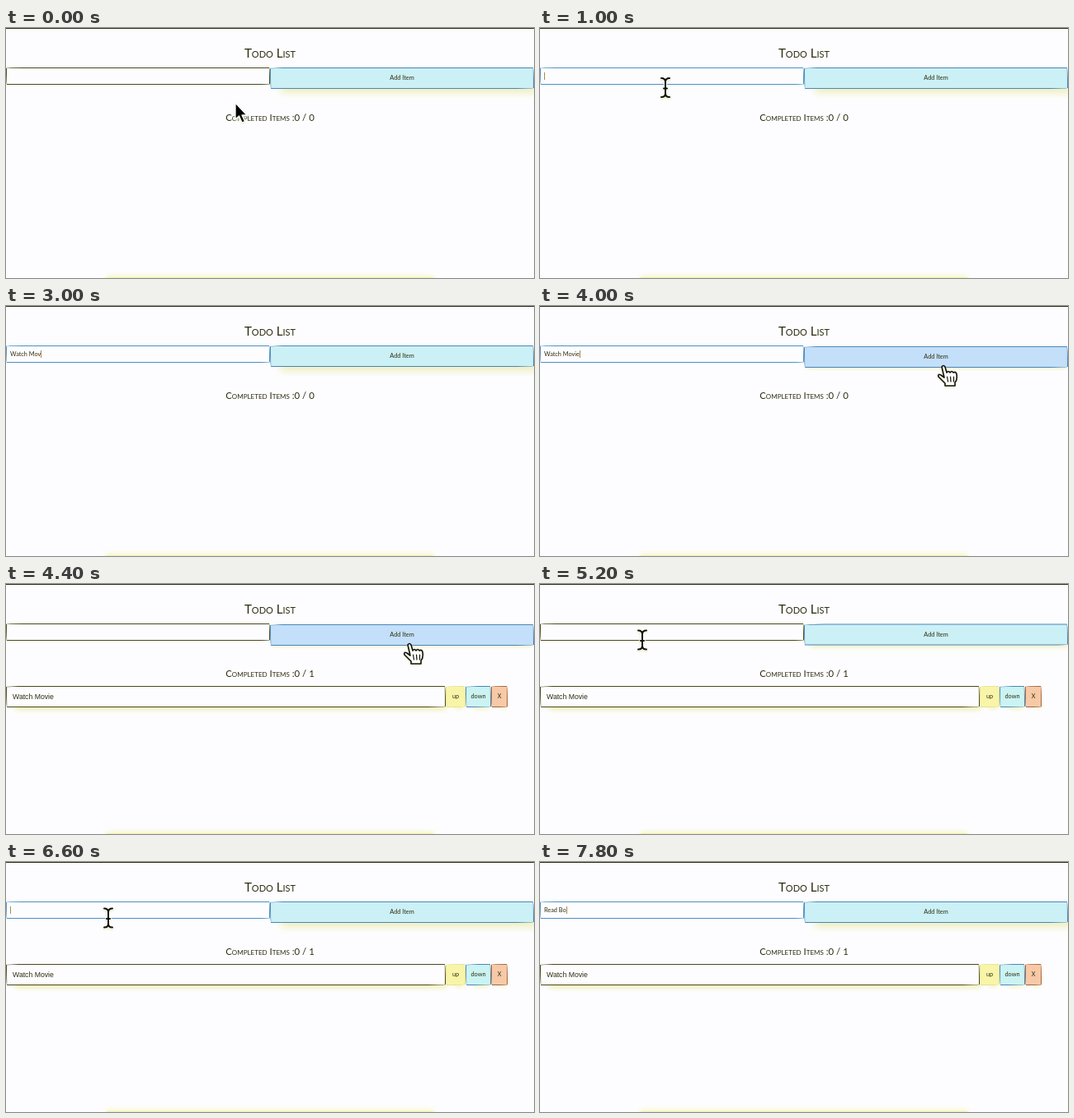
Write an HTML page that moves like this. It is 640 by 304 pixels and loops after 8 s.

```html
<!DOCTYPE html>
<html lang="en">
<head>
<meta charset="utf-8">
<title>Todo List</title>
<style>
  html, body { margin: 0; width: 100%; height: 100%; overflow: hidden; background: #fdfdff; }
  #stage {
    position: relative; width: 640px; height: 304px; overflow: hidden;
    background: #fdfdff; color: #2e2d10; font: 7.3px Lato, sans-serif;
  }
  #stage > *, #row > * { position: absolute; box-sizing: border-box; white-space: pre; }
  #topline { left: 0; top: 0; width: 640px; height: 1px; background: #2c2c14; }
  .heading { left: 0; width: 640px; text-align: center; font-variant: small-caps; }
  #title { top: 19.5px; font-size: 15.2px; line-height: 21px; }
  #count { top: 100px; font-size: 11.4px; line-height: 17px; }
  .box {
    border: 1px solid #4a4917; background: #fdfdff;
    border-radius: 127px 7px 112px 7px / 7px 112px 7px 127px;
  }
  #field { left: 0; top: 48px; width: 320px; height: 21px; padding-left: 4px; line-height: 20px; }
  #field.focus { border-color: #4c8fc4; }
  #caret { display: inline-block; width: .8px; height: 9px; background: #a88c48; vertical-align: -1.5px; }
  .button { text-align: center; }
  #add { left: 320px; top: 48px; width: 320px; height: 26px; line-height: 23px; border-color: #4b86b5; }
  #row > * { top: 124px; height: 26px; line-height: 23px; }
  #item {
    left: 0; width: 533px; padding-left: 7px; line-height: 25px !important;
    font: 8.7px "Liberation Sans", Arial, sans-serif; box-shadow: 6px 8px 6px -5px #f0f0b4;
  }
  #row .button { box-shadow: 4px 8px 6px -7px #eeeeaa; }
  #up { left: 533px; width: 24px; background: #f8f5a9; border-color: #e9e18c; }
  #down { left: 557px; width: 31px; background: #cbf3f3; border-color: #4b86b5; }
  #remove { left: 588px; width: 20px; background: #f7c9a6; border-color: #a0663c; }
  #footer { left: 122px; top: 303px; width: 396px; height: 12px; background: #f2f2b0; box-shadow: 0 0 8px #f2f2b0; }
  #pointer { left: 0; top: 0; overflow: visible; filter: drop-shadow(.5px 1px 1px #e8e8c0); }
</style>
</head>
<body>
<div id="stage">
  <div id="topline"></div>
  <div id="title" class="heading">Todo List</div>
  <div id="field" class="box"><span id="typed"></span><i id="caret"></i></div>
  <div id="add" class="box button">Add Item</div>
  <div id="count" class="heading"></div>
  <div id="row">
    <div id="item" class="box">Watch Movie</div>
    <div id="up" class="box button">up</div>
    <div id="down" class="box button">down</div>
    <div id="remove" class="box button">X</div>
  </div>
  <div id="footer"></div>
  <svg id="pointer" width="1" height="1" stroke-linejoin="round" stroke-linecap="round">
    <path id="arrow" d="M0 0V20L4.5 16L8 24L11.5 22.5L8 15H14Z" fill="#000" stroke="#fff" stroke-width="1.3"/>
    <g id="beam" fill="none">
      <path d="M-5-11.5Q0-11.5 0-7Q0-11.5 5-11.5M0-7V7M-5 11.5Q0 11.5 0 7Q0 11.5 5 11.5M-2 1H2" stroke="#fff" stroke-width="3.4"/>
      <path d="M-5-11.5Q0-11.5 0-7Q0-11.5 5-11.5M0-7V7M-5 11.5Q0 11.5 0 7Q0 11.5 5 11.5M-2 1H2" stroke="#111106" stroke-width="2"/>
    </g>
    <g id="hand" stroke="#111106" stroke-width="1.6" fill="#fff">
      <path d="M-2 1Q0-2 2 1L4 8Q6 5 8 8Q10 5 12 8Q15 6 16 10Q17 17 14 20V24H2V21L-6 13Q-7 9-3 11L1 14Z"/>
      <path d="M4.5 13L5.5 19M8.5 13L9 19M12.5 13V19" fill="none" stroke-width="1.2"/>
    </g>
  </svg>
</div>
<script>
const LOOP = 8000, STEP = 200, KEY_DELAY = 150;
const ADDED = 4200;
const typing = [
  { text: "Watch Movie", focus: 1000, start: 1700, end: ADDED },
  { text: "Read Book", focus: 5600, start: 6800, end: LOOP }
];
// time, x, y of the pointer's hot spot
const path = [
  [0, 278, 91], [800, 152, 72.5], [3400, 152, 72.5],
  [4000, 489, 73], [4600, 489, 73], [5200, 124, 68], [LOOP, 124, 68]
];
const $ = id => document.getElementById(id);
const show = (id, on) => { $(id).style.visibility = on ? "visible" : "hidden"; };
const ramp = (t, from, to) => {
  const p = Math.min(1, Math.max(0, (t - from) / (to - from)));
  return p * p * (3 - 2 * p);
};

function pointerAt(t) {
  const i = path.findIndex(key => key[0] > t);
  const [t0, x0, y0] = path[i - 1], [t1, x1, y1] = path[i];
  const p = ramp(t, t0, t1);
  return [x0 + (x1 - x0) * p, y0 + (y1 - y0) * p];
}

function drawField(t) {
  const entry = typing.find(e => t >= e.focus && t < e.end);
  const length = entry ? Math.max(0, Math.floor((t - entry.start) / KEY_DELAY + 1)) : 0;
  $("typed").textContent = entry ? entry.text.slice(0, length) : "";
  $("field").classList.toggle("focus", !!entry);
  const blinkOn = entry && (length > 0 || Math.floor((t - entry.focus) / 500) % 2 === 0);
  show("caret", blinkOn);
}

function drawPointer(t) {
  const [x, y] = pointerAt(t);
  const visible = t < 1700 || (t >= 3400 && t < 6800);
  const kind = y > 74 ? "arrow" : x < 320 ? "beam" : "hand";
  for (const id of ["arrow", "beam", "hand"]) show(id, visible && id === kind);
  $("pointer").style.transform = `translate(${x}px, ${y}px)`;
  return visible && kind === "hand";
}

function drawButton(t, hovered) {
  const press = ramp(t, 3650, 3950) - ramp(t, 5050, 5400);
  const mix = (a, b) => a + (b - a) * press + "px";
  const style = $("add").style;
  style.background = hovered ? "#c3dffa" : "#cbf0f6";
  style.transform = `translateY(${press}px)`;
  style.boxShadow = `${mix(9, 1)} ${mix(9, 4)} ${mix(10, 4)} ${mix(-4, -3)} #eeeebc`;
}

function draw(t) {
  drawField(t);
  drawButton(t, drawPointer(t));
  const added = t >= ADDED;
  $("count").textContent = `Completed Items :0 / ${added ? 1 : 0}`;
  $("row").style.display = added ? "block" : "none";
}

const began = performance.now();
function tick() {
  const t = (performance.now() - began) % LOOP;
  draw(Math.floor(t / STEP) * STEP);
  requestAnimationFrame(tick);
}
tick();
</script>
</body>
</html>
```
